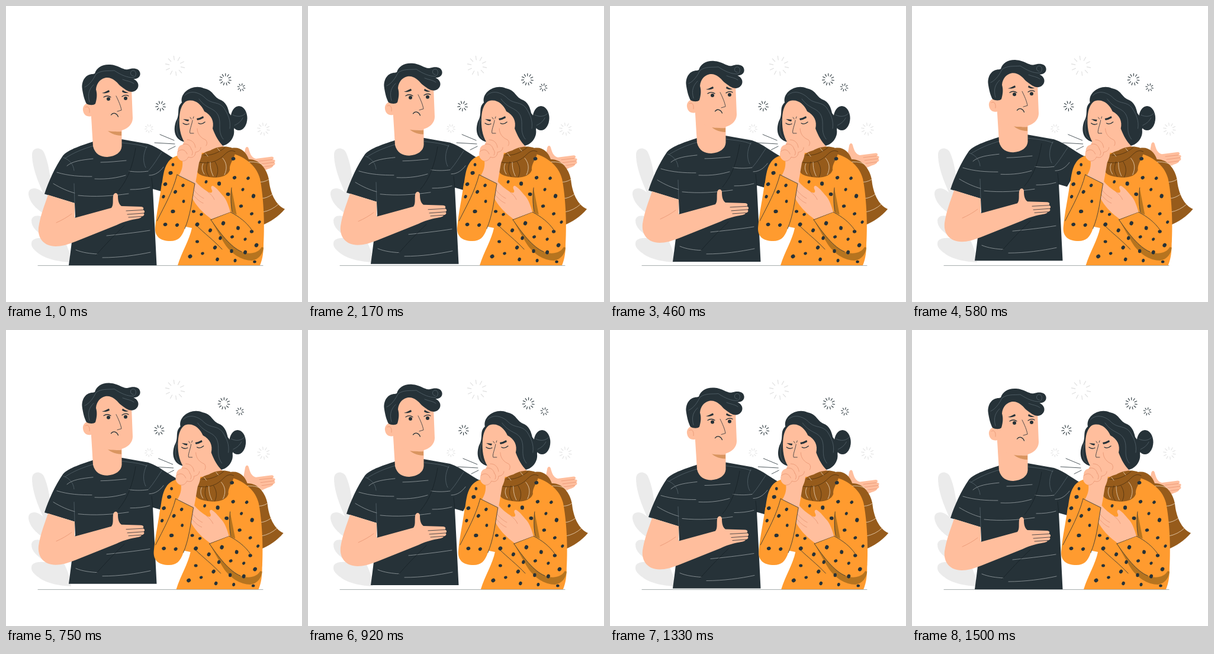
Write an HTML page that moves like this. It is 500 px wide and 500 px high and loops after 1540 ms.

```html
<!DOCTYPE html>
<html lang="en">
<head>
<meta charset="utf-8">
<title>Cough</title>
<style>
html, body { margin: 0; height: 100%; overflow: hidden; background: #fff; }
svg { display: block; width: 100vw; height: 100vh; }
path { stroke-linecap: round; stroke-linejoin: round; }
.dark { fill: #263238; }
.skin { fill: #ffbe9d; }
.shade { fill: #d99560; }
.coat { fill: #ff9b2f; }
.scarf { fill: #965b1b; }
.leaf { fill: #ebebeb; }
.line { fill: none; stroke: #263238; stroke-width: .8; }
.bold { fill: none; stroke: #263238; stroke-width: 1.3; }
.crease { fill: none; stroke: #e48e6c; stroke-width: .7; }
.pale { fill: none; stroke: #a9b1b4; stroke-width: .7; }
.strand { fill: none; stroke: #66757d; stroke-width: .6; }
.fold { fill: none; stroke: #172126; stroke-width: .8; }
.knit { fill: none; stroke: #efd9bd; stroke-width: .8; }
.seam { fill: none; stroke: #4f3210; stroke-width: .8; }
</style>
</head>
<body>
<svg viewBox="0 0 500 500">
  <g class="leaf">
    <path d="M44 251C44 239 58 237 64 247C71 262 75 285 78 318L72 335C57 305 44 275 44 251Z"/>
    <path d="M38 318C37 308 48 305 57 311C68 318 80 336 80 350L66 352C50 343 39 330 38 318Z"/>
    <path d="M43 363C43 354 54 352 63 357C82 366 100 390 108 420C75 395 43 382 43 363Z"/>
    <path d="M43 401C43 391 60 390 76 394C98 400 108 415 110 433C90 432 70 428 58 420C48 413 42 407 43 401Z"/>
  </g>
  <g id="still"></g>
  <path d="M54 438.4H434" fill="none" stroke="#7f878a" stroke-width=".7"/>

  <g id="man">
    <path class="skin" d="M400 264L404 242C405 237 409 237 410 241C412 248 414 256 422 258L449 254.500C453 255 453 258 450 259.500C455 259 456 262 453 264C456 266 454 269 451 269.500C451 273 446 274 441 276L425 283L400 280Z"/>
    <path class="crease" d="M428 262L450 259.500M430 267L453 264M432 272L451 269.500"/>
    <path class="dark" d="M147 229C130 235 105 242 96 253C83 272 72 296 65 317.500L116 333L117 355C113 380 110 410 106 438H254.500L248 309L262 313L292 262C272 252 260 240 240 233L195 225Z"/>
    <path class="pale" d="M103 270C112 262 128 260 147 258M160 264C175 264 190 262 203 261M86 281C106 287 125 288 145 288M150 292C172 293 188 290 202 286M208 279C222 281 232 280 240 279M80 300C93 308 105 313 116 316M122 320C150 323 178 321 207 317M210 310C222 310 232 309 243 306M118 412C130 417 142 418 154 419M163 425C192 425 220 421 244 416M170 388C190 386 218 383 243 379M242 286C252 286 260 280 266 272"/>
    <path class="strand" d="M100 257C114 248 128 242 148 236M196 231C212 233 226 234 238 239M97 256C108 260 114 268 115 278M238 237C231 250 231 264 236 273M263 247C256 257 250 268 241 278M116 333L115 300"/>
    <path class="fold" d="M219 240C214 270 206 293 190 312M200 371C182 388 166 405 152 421M248 309L246 290"/>
    <path class="skin" d="M143 172L147 237C150 250 160 255 171 255C185 254 195 247 195.500 237V200Z"/>
    <path class="shade" d="M168 206C175 211 185 213 195 212V219C184 219 173 214 168 206Z"/>
    <path class="skin" d="M143 165C135 162 129 169 130 176C131 184 137 188 144 186C146 200 156 208 172 211C196 215 214 205 214 189L212 138L180 114L148 130Z"/>
    <path class="crease" d="M134 171C139 168 142 173 141 180"/>
    <path class="dark" d="M147 115C135 115 128 125 128.500 138C130 150 133 160 136 165C141 168 148 168 151 165C154 155 154 148 152 141C153 130 159 124 167 121.500C178 119 186 127 192 134C200 140 205 145 213 145C222 144 226 135 222 129C219 124 215 123 211 123C219 125 228 121 226.500 113C225 105 215 104 206 107C198 109 191 100 176 99C163 98 153 104 150 114Z"/>
    <path class="strand" d="M133 137C142 133 148 123 152 115C161 108 172 110 183 109C195 117 205 121 215 121C222 118 220 108 214 109C209 110 209 118 215 118M141 162C137 148 141 140 148 133M197 124C204 127 211 127 216 131"/>
    <path class="dark" d="M162 147C167 146 171 143 174 142L175 145C171 147 167 148 162 147ZM196 145L197 142C200 144 204 146 207 146C204 148 199 147 196 145Z"/>
    <circle class="dark" cx="173" cy="157" r="3"/>
    <circle class="dark" cx="202" cy="156" r="3"/>
    <path class="bold" d="M165 154Q171 150 177 154M196 153Q202 149 207 152M177.500 184C181 179 187 181 189.500 187"/>
    <path class="line" d="M186 152C190 160 194 169 195 176L188 178"/>
    <path class="skin" d="M71 319L116 333V358L178 341C182 336 180 329 181 321C182 315 188 314 189 320C189 328 190 334 195 338L228 339C233 339 233 343 231 344.500C235 345 235 349 232 350C235 352 233 355 229 355.500C229 358 225 359 219 360C207 362 195 366 187 370L117 398C104 403 94 406 84 406C64 406 53 392 55 374C58 354 65 337 71 319Z"/>
    <path class="crease" d="M85 366C94 362 103 357 111 351"/>
    <path class="line" d="M203 346L231 344.500M205 352L232 350M207 357L229 355.500"/>
  </g>

  <g id="woman">
    <path class="scarf" d="M378 241C394 236 405 245 410 259C427 258 441 275 444 293C446 315 455 336 471 343C460 356 446 365 433 370L420 290L385 262Z"/>
    <path class="knit" d="M404 264C418 262 430 264 437 271M425 297Q434 299 444 293M432 325Q440 325 450 318M434 348Q449 345 460 335"/>
    <ellipse class="dark" cx="393.500" cy="189.500" rx="14" ry="20.500"/>
    <path class="strand" d="M383 184C391 188 400 187 405 181M385 202C392 199 397 195 400 189"/>
    <path class="dark" d="M297 163C287 172 295 182 287 195C282 210 285 224 299 229L335 238L366 236C377 234 387 222 385 209C388 197 383 188 377 181C375 172 372 162 361 158C350 153 350 142 334 139C317 131 293 145 297 163Z"/>
    <path class="skin" d="M304 161C318 156 329 165 335 178C347 184 352 195 349 207C354 220 359 229 368 238L350 258L329 251L302 231C294 219 292 203 293 187C294 175 297 166 304 161Z"/>
    <path class="strand" d="M302 151C312 141 328 146 338 157C349 166 359 161 368 172C375 183 380 193 378 207M326 157C339 175 351 171 358 184C365 198 356 211 367 225M291 191C287 205 288 218 295 224"/>
    <path class="dark" d="M299 191L309 192L308 195Q303 194 299 191ZM322 190Q328 189 333 186L334 189Q329 192 323 193Z"/>
    <path class="bold" d="M299 198Q304 202 309 199M325 198Q330 201 336 196"/>
    <path class="line" d="M315 193C314 201 309 211 311 215L317 215M311 188L313 191M317 187L316 190"/>
    <path class="crease" d="M323 207C323 216 329 223 337 226C340 229 340 233 338 236"/>
    <path class="coat" d="M331 248C310 248 282 249 273 265C266 275 265 290 262 310L290 370L314 375C310 395 297 415 290 438H429C434 426 435 414 435 401C437 365 435 322 429 292C424 272 407 256 382 249Z"/>
    <path class="shade" style="fill:#b6741f" d="M346 361L367 398C379 419 399 430 415 430C428 428 434 418 435 408L404 400ZM381 308C379 325 379 338 383 350L390 354Z"/>
    <path class="coat" d="M346 361L379 348L420 365L435 396C434 415 416 422 398 415C380 408 361 383 346 361Z"/>
    <path class="line" d="M346 361L379 348C394 356 406 365 415 378M346 361C361 383 380 408 398 415M381 307C379 322 380 338 382 348M322 371C335 384 350 395 365 411"/>
    <path class="skin" d="M347 360C335 351 325 342 317 329C313 322 315 318 318 321C312 313 313 308 317 310C313 301 315 293 319 295C326 303 333 309 341 314C347 317 349 315 348 311C345 306 347 303 350 304C357 308 362 316 367 321C373 328 376 338 379 348Z"/>
    <path class="crease" d="M317 310C322 317 328 322 334 325M318 321C323 327 328 331 333 333M341 314C346 318 350 322 352 327"/>
    <path class="scarf" d="M324 264C324 253 334 247 345 244C356 237 371 236 380 239C388 242 388 249 385 255C381 264 377 270 378 277C375 287 361 291 348 289.500C335 288 323 286 322 277Z"/>
    <path class="seam" d="M327 264C342 267 356 263 366 254C374 246 379 242 387 246M334 252C345 253 358 249 370 239M341 263C337 273 338 281 343 288M353 263C359 272 359 281 355 289"/>
    <path class="knit" d="M345 264C345 272 346 279 350 287M366 257C373 265 374 275 369 285M333 266C330 272 331 278 335 284M337 249L341 254M357 240L361 245"/>
    <path class="skin" d="M290 289C297 280 299 270 298 262C290 260 287 252 290 245C290 238 294 235 299 234C300 226 308 221 315 223C323 224 328 230 329 239C333 250 329 258 326 265C324 276 322 290 319 304Z"/>
    <path class="crease" d="M299 234C305 231 311 235 313 242M290 246C297 240 303 243 306 250M306 226C314 226 319 231 320 239M298 262C302 262 306 260 308 255C314 258 320 254 320 247C326 246 329 243 329 239M313 242Q317 247 314 252"/>
    <path class="coat" d="M289 285L319 300C314 328 312 352 302 376C297 391 290 397 278 397C260 397 251 389 252 374C254 350 260 324 263 300C272 290 279 285 289 285Z"/>
    <path class="line" d="M289 285L319 300C314 328 312 352 302 376M289 285C281 315 269 335 255 363"/>
    <g id="dots" class="dark"></g>
    <path class="line" d="M260 217L284 227M251 231L285 233M274 243L286 237"/>
  </g>
</svg>
<script>
const byId = id => document.getElementById(id);

function add(parent, tag, attrs) {
  const node = document.createElementNS('http://www.w3.org/2000/svg', tag);
  for (const key in attrs) node.setAttribute(key, attrs[key]);
  byId(parent).append(node);
}

function burst(parent, x, y, inner, outer, rays, color) {
  let d = '';
  for (let i = 0; i < rays; i++) {
    const a = (i + .3) / rays * 2 * Math.PI;
    const c = Math.cos(a), s = Math.sin(a);
    d += `M${x + inner * c} ${y + inner * s}L${x + outer * c} ${y + outer * s}`;
  }
  add(parent, 'path', { d, stroke: color, 'stroke-width': 1.1 });
}

burst('still', 285.5, 101, 10, 16.5, 10, '#dedede');
burst('still', 435, 208, 6, 10.5, 10, '#e2e2e2');
burst('still', 241.5, 207, 4, 7, 9, '#e2e2e2');
burst('woman', 370.5, 124, 6, 10, 11, '#263238');
burst('woman', 397.5, 137.5, 3.5, 6.5, 8, '#263238');
burst('woman', 261, 169, 4.5, 8.5, 9, '#263238');

const dots = [
  282,268, 278,282, 269,301, 286,314, 266,322, 300,330, 282,347, 269,369, 289,370, 299,303,
  338,297, 360,300, 384,258, 386,290, 409,291, 400,310, 418,321, 375,318, 397,338, 415,351,
  428,365, 367,367, 392,375, 415,381, 382,390, 404,394, 423,404, 404,416, 381,414, 317,347,
  330,352, 323,369, 345,379, 362,392, 323,398, 332,418, 311,423, 353,408, 357,428, 387,430, 420,432
];
for (let i = 0; i < dots.length; i += 2) {
  const [x, y] = dots.slice(i, i + 2);
  const r = 2.3 + i * 7 % 5 * .2;
  add('dots', 'ellipse', { rx: r, ry: r + .5, transform: `translate(${x} ${y}) rotate(${i * 37 % 90})` });
}

const LOOP = 1540, CYCLE = 1500, STEP = 1000 / 24, PHASE = 27;
const shake = [0, -1, 2, -4, 4, -4, 4, -4, 2, -1, 0];

function draw() {
  const step = Math.floor((performance.now() % LOOP + 5) / STEP);
  const p = (step * STEP + PHASE) % CYCLE / CYCLE;
  const k = Math.floor(p * 10);
  const x = shake[k] + (shake[k + 1] - shake[k]) * (p * 10 - k);
  const y = -10 * (1 - Math.abs(2 * p - 1));
  byId('man').setAttribute('transform', `translate(0 ${y + .36})`);
  byId('woman').setAttribute('transform', `translate(${x + .2} 0)`);
  requestAnimationFrame(draw);
}
draw();
</script>
</body>
</html>
```
